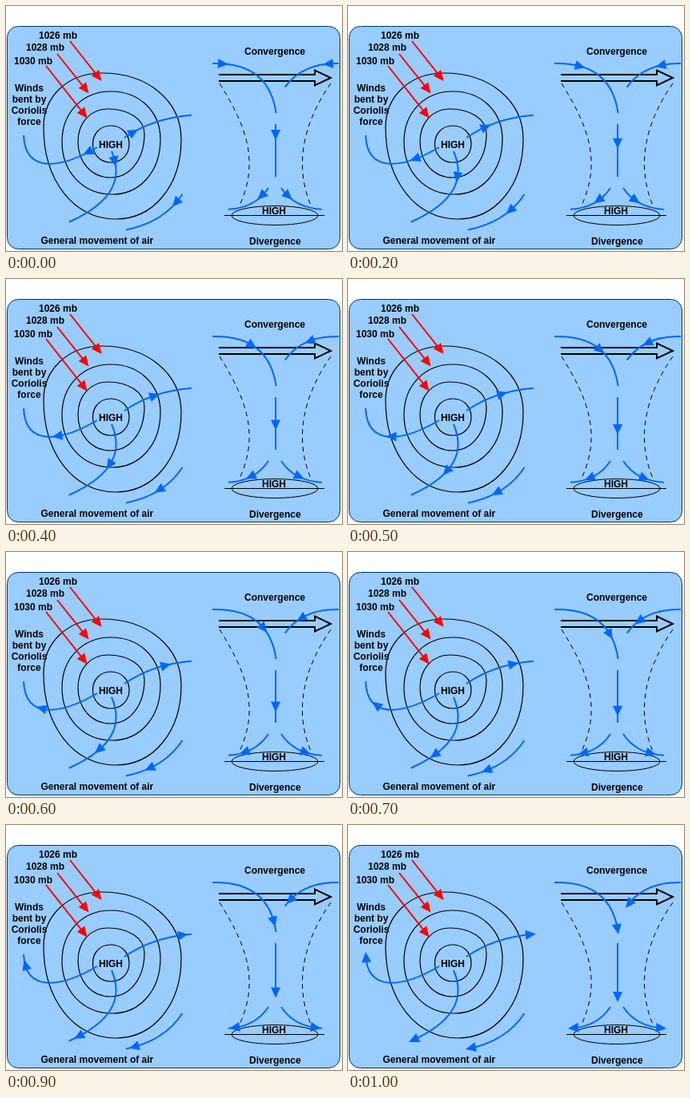
Animation of 420x307 px, one loop 1.1 s. Source, as an HTML page:

```html
<!DOCTYPE html>
<html lang="en">
<head>
<meta charset="utf-8">
<title>High pressure circulation</title>
<style>
  html, body { margin: 0; width: 100%; height: 100%; overflow: hidden; background: #fff; }
  svg { display: block; width: 420px; height: 307px; }
  text { font: bold 12px "Liberation Sans", Arial, sans-serif; }
  path, ellipse { fill: none; stroke: #000; }
  #isobars path { stroke-width: 1.2; }
  .wind { stroke: #06f; stroke-width: 2; }
  .pressure { stroke: #f00; stroke-width: 2; }
  .head { stroke: none; fill: #06f; }
  .pressure + .head { fill: #f00; }
  .centred { text-anchor: middle; }
</style>
</head>
<body>
<svg viewBox="0 0 420 307">
  <rect x="1.5" y="25.5" width="416" height="279" rx="14" fill="#9cf" stroke="#036"/>
  <g id="isobars"></g>
  <g stroke-dasharray="6 5">
    <path d="M267 97C300 150 318 195 291 252"/>
    <path d="M406 97C376 140 357 195 382 252"/>
  </g>
  <ellipse cx="336" cy="262.5" rx="54" ry="12"/>
  <path d="M273 262.5H398"/>
  <path d="M266 86H386V80.500L406 90L386 99.500V94H266" stroke-width="2"/>
  <g id="arrows"></g>
  <text x="41" y="41">1026 mb</text>
  <text x="25" y="56">1028 mb</text>
  <text x="10" y="73">1030 mb</text>
  <g class="centred">
    <text x="29" y="107">Winds</text>
    <text x="29" y="121">bent by</text>
    <text x="29" y="135">Coriolis</text>
    <text x="29" y="149">force</text>
  </g>
  <text x="116" y="178">HIGH</text>
  <text x="320" y="261">HIGH</text>
  <text x="298" y="61">Convergence</text>
  <text x="304" y="299">Divergence</text>
  <text x="43.500" y="298">General movement of air</text>
</svg>
<script>
const STEP = 100, STEPS = 11;
const HEAD = 13;   // length of an arrowhead
const START = 20;  // where each head begins along its line

function add(parent, d, cls = "") {
  const path = document.createElementNS("http://www.w3.org/2000/svg", "path");
  path.setAttribute("d", d);
  path.setAttribute("class", cls);
  document.getElementById(parent).append(path);
  return path;
}

// Lopsided oval through its topmost, rightmost, bottom and leftmost points
function isobar(...corners) {
  const bend = 0.58;
  let d = "M" + corners[0];
  corners.forEach(([x, y], i) => {
    const [nx, ny] = corners[(i + 1) % 4];
    const dx = (nx - x) * bend, dy = (ny - y) * bend;
    d += i % 2
      ? `C${x} ${y + dy} ${nx - dx} ${ny} ${nx} ${ny}`
      : `C${x + dx} ${y} ${nx} ${ny - dy} ${nx} ${ny}`;
  });
  add("isobars", d + "Z");
}

// Puts the tip at a distance along the line, turned along the chord behind it
function placeHead(head, line, dist) {
  const tip = line.getPointAtLength(dist);
  const tail = line.getPointAtLength(Math.max(0, dist - HEAD));
  const angle = Math.atan2(tip.y - tail.y, tip.x - tail.x) * 180 / Math.PI;
  head.setAttribute("transform", `translate(${tip.x} ${tip.y}) rotate(${angle})`);
}

// The visible line stops short of the tip by the gap
function arrow(d, cls, gap = 3) {
  const line = add("arrows", d, cls);
  const length = line.getTotalLength();
  line.setAttribute("stroke-dasharray", `${length - gap} 999`);
  const head = add("arrows", `M0 0L${-HEAD} -6V6Z`, "head");
  placeHead(head, line, length);
  return { line, head, length };
}

isobar([120, 84], [219, 167], [137, 267], [47, 152]);
isobar([131, 107], [193, 167], [133, 236], [70, 170]);
isobar([127, 129], [173, 160], [131, 215], [90, 170]);
isobar([131, 150], [154, 173], [131, 196], [108.5, 173]);

["M80 44L119.5 94", "M64 60L103.5 109.500", "M50 75L101.5 140.500"]
  .forEach(d => arrow(d, "pressure"));

const winds = [
  "M148 165Q184 140 235 136.500",
  "M114 177C70 203 22 212 22 159",
  "M132 182C147 217 133 247 76 272",
  "M220.5 236Q197 272 147 281",
  "M258 72Q330 70 338 137",
  "M416 72Q369 71 347 104",
  "M337 148V222",
  "M328 228Q311 254 275 255",
  "M344 228Q361 254 398 255"
].map(d => arrow(d, "wind", d.includes("V") ? 8 : 3));

function draw(now) {
  const progress = Math.floor(now / STEP) % STEPS / (STEPS - 1);
  for (const { line, head, length } of winds)
    placeHead(head, line, START + (length - START) * progress);
}

const begin = performance.now();
function tick() {
  draw(performance.now() - begin);
  requestAnimationFrame(tick);
}
tick();
</script>
</body>
</html>
```
